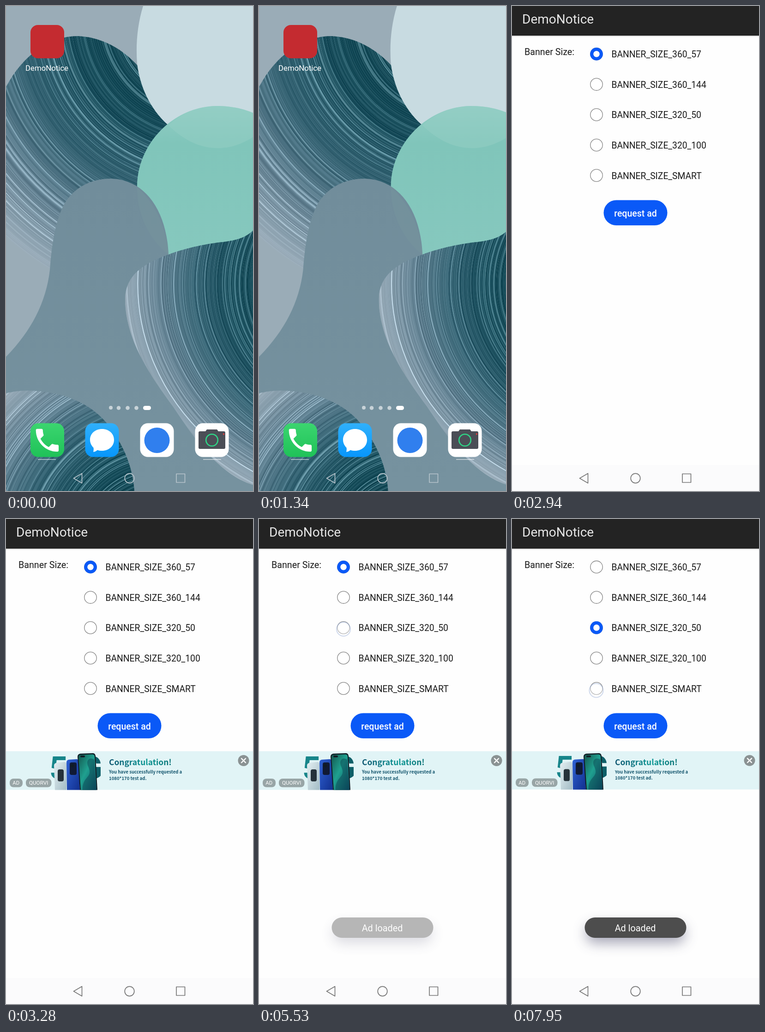
These frames come from a looping animation (535 by 1048 pixels, 8 s). An HTML page:

```html
<!DOCTYPE html>
<html lang="en">
<head>
<meta charset="utf-8">
<title>Banner ad demo</title>
<style>
  html, body { margin: 0; width: 100%; height: 100%; overflow: hidden; background: #fefefe; }
  svg { display: block; width: 535px; height: 1048px; }
  text { font-family: Roboto, Inter, sans-serif; }
  .promo { font-family: "Noto Sans CJK SC", "Noto Sans CJK JP", "Noto Sans", sans-serif; font-weight: 700; }
</style>
</head>
<body>
<svg viewBox="0 0 535 1048" xmlns="http://www.w3.org/2000/svg">
  <defs>
    <clipPath id="c1"><path d="M0 175C38 103 98 65 155 65C212 67 258 98 287 131L360 262L300 420L97 568C60 547 22 518 0 497Z"/></clipPath>
    <clipPath id="c2"><path d="M535 485C518 502 495 507 470 510C440 513 395 521 352 537C300 556 258 580 258 636C260 722 310 795 362 866C405 930 460 1012 535 1035Z"/></clipPath>
    <clipPath id="c3"><path d="M0 837C15 833 32 831 50 831C125 833 183 860 216 899C250 940 274 990 278 1048H0Z"/></clipPath>
    <clipPath id="adClip"><rect y="501.500" width="535" height="84"/></clipPath>
    <linearGradient id="mint" x2="0" y2="1"><stop stop-color="#92cdc4"/><stop offset=".25" stop-color="#80c5ba"/><stop offset="1" stop-color="#86c8be"/></linearGradient>
    <linearGradient id="hill" x2="0" y2="1"><stop stop-color="#718d9b"/><stop offset="1" stop-color="#76929f"/></linearGradient>
    <linearGradient id="green" x2="0" y2="1"><stop stop-color="#3bd56f"/><stop offset="1" stop-color="#1fc258"/></linearGradient>
    <linearGradient id="blue" x2="0" y2="1"><stop stop-color="#30b0fb"/><stop offset="1" stop-color="#0796fb"/></linearGradient>
    <linearGradient id="title" x2="1" y2="0"><stop stop-color="#0d5570"/><stop offset=".6" stop-color="#0f9a96"/><stop offset="1" stop-color="#0c7276"/></linearGradient>
    <linearGradient id="teal" x2="1" y2="1"><stop stop-color="#14584f"/><stop offset=".45" stop-color="#1fa08f"/><stop offset="1" stop-color="#0b4a63"/></linearGradient>
    <linearGradient id="navy" x2="1" y2="1"><stop stop-color="#2f62d4"/><stop offset="1" stop-color="#112f8e"/></linearGradient>
    <linearGradient id="silver" x2="1" y2="1"><stop stop-color="#e4eff2"/><stop offset="1" stop-color="#a3bcc5"/></linearGradient>
    <linearGradient id="drop" x2="0" y2="1"><stop stop-color="#000" stop-opacity=".2"/><stop offset="1" stop-color="#000" stop-opacity="0"/></linearGradient>
    <filter id="blur" x="-30%" y="-100%" width="160%" height="300%"><feGaussianBlur stdDeviation="14"/></filter>
  </defs>

  <g id="home">
    <g id="wall">
      <rect width="535" height="1048" fill="#9aacb7"/>
      <g id="s1" clip-path="url(#c1)"/>
      <path d="M297 0C284 42 281 85 284 125C292 190 325 235 352 258C385 290 420 307 458 307C490 307 515 296 535 283V0Z" fill="#c8dbe1"/>
      <path d="M535 231C510 220 482 216 455 216C360 218 284 300 284 390C284 450 310 505 352 537L470 512C500 507 520 500 535 487Z" fill="url(#mint)"/>
      <path d="M352 258C385 290 420 307 458 307C490 307 515 296 535 283V231C510 220 482 216 455 216C415 217 380 232 352 258Z" fill="#95d0c6" opacity=".5"/>
      <path d="M0 758C55 702 87 640 95 570C100 500 110 460 125 430C145 395 180 373 228 373C300 375 348 440 352 537L535 600V1048H0Z" fill="url(#hill)"/>
      <path d="M284 392C310 415 345 460 352 537C310 505 284 450 284 392Z" fill="#76959e" opacity=".5"/>
      <g id="s2" clip-path="url(#c2)"/>
      <g id="s3" clip-path="url(#c3)"/>
    </g>

    <rect x="53" y="41" width="73" height="72" rx="16" fill="#c42b30"/>
    <g fill="#fff">
      <g opacity=".6"><circle cx="227" cy="868" r="4"/><circle cx="244" cy="868.500" r="4.300"/><circle cx="263.500" cy="868.500" r="4.300"/><circle cx="282.500" cy="868.500" r="4.300"/></g>
      <rect x="297" y="864" width="17" height="9" rx="4.500"/>
      <path d="M69 979h39v1.500h-39zM427 979h39v1.500h-39z" opacity=".65"/>
    </g>
    <rect x="53" y="901.500" width="73" height="73" rx="17" fill="url(#green)"/>
    <path transform="translate(56.500 905.500) scale(2.740)" fill="#fff" d="M6.620 10.790c1.440 2.830 3.760 5.140 6.590 6.590l2.200-2.200c.27-.27.67-.36 1.020-.24 1.120.37 2.330.57 3.570.57.55 0 1 .45 1 1V20c0 .55-.45 1-1 1-9.390 0-17-7.610-17-17 0-.55.45-1 1-1h3.500c.55 0 1 .45 1 1 0 1.250.2 2.450.57 3.570.11.35.03.74-.25 1.020z"/>
    <rect x="171.500" y="901.500" width="73" height="73" rx="17" fill="url(#blue)"/>
    <path fill="#fff" d="M208 914C223 914 234 924 234 937.500S223 961 208 961C204 961 201 960.500 198 959.500C195 962 192 963.500 189 963.500C190 960 190 957 189.500 954.500C185 950 182 944 182 937.500C182 924 193 914 208 914Z"/>
    <rect x="290.500" y="901.500" width="73" height="73" rx="17" fill="#fff"/>
    <circle cx="327" cy="938.500" r="27.500" fill="#307fee"/>
    <rect x="409.500" y="901.500" width="73" height="73" rx="17" fill="#fff"/>
    <path fill="#4b4e56" d="M420 919H432L435 915H457L460 919H472Q475 919 475 922V954Q475 957 472 957H420Q417 957 417 954V922Q417 919 420 919Z"/>
    <circle cx="446" cy="938" r="12.800" fill="#4b4e56" stroke="#2fd486" stroke-width="2.600"/>
    <circle cx="471.500" cy="925" r="1.800" fill="#e23b3b"/>
  </g>

  <g id="app">
    <rect id="back" width="535" height="1048"/>
    <rect y="992" width="535" height="56" fill="#fbfbfc"/>
    <rect y="64" width="535" height="3" fill="url(#drop)"/>
    <rect width="535" height="64" fill="#232323"/>
    <g id="list"/>
    <g id="page">
      <g id="radios"/>
      <rect id="pill" y="419.500" height="54.500" rx="27.250" fill="#0a59f7"/>
      <g id="ad">
        <g clip-path="url(#adClip)">
          <rect y="501.500" width="535" height="84" fill="#e1f4f6"/>
          <g id="big"/>
          <path d="M104 533Q104 528 109 527L126 525Q131 525 131 530V586H106Z" fill="url(#silver)"/>
          <rect x="112" y="541" width="13" height="26" rx="4" fill="#26323a"/>
          <path d="M131 526Q131 521 136 520L153 519Q158 519 158 525L160 586H132Z" fill="url(#navy)"/>
          <rect x="138" y="526" width="15" height="27" rx="4" fill="#101a35"/>
          <path d="M155 514Q155 508 161 507L188 506Q193 506 194 512L198 586H160Z" fill="#101c24"/>
          <path d="M157 514Q157 510 161 509.500L187 508.500Q191.500 508.500 192 513L196 586H162Z" fill="url(#teal)"/>
          <path d="M166 586C164 555 190 560 178 535C172 522 181 513 191 520L195 586Z" fill="#0a3c4c" opacity=".45"/>
          <g fill="#101c24"><circle cx="143.500" cy="533" r="3.500"/><rect x="161" y="511" width="10" height="4" rx="2"/></g>
        </g>
        <rect x="8" y="561" width="28" height="18.500" rx="8" fill="#98a5a6"/>
        <rect x="43" y="561" width="55.500" height="18.500" rx="8" fill="#98a5a6"/>
        <circle cx="514.500" cy="522" r="12" fill="#8a9293"/>
        <path d="M510 517.500l9 9m0-9l-9 9" stroke="#fff" stroke-width="2.400" stroke-linecap="round"/>
      </g>
      <g id="toast">
        <rect x="160" y="876" width="215" height="40" rx="20" fill="#4c4c6c" opacity=".5" filter="url(#blur)"/>
        <rect x="157.500" y="861" width="220" height="44" rx="22" fill="#4d4d4d"/>
      </g>
    </g>
  </g>

  <g id="nav" fill="none" stroke-width="1.700" stroke-linejoin="round">
    <path d="M146.500 1020.500L164.500 1010V1031Z"/><circle cx="267.500" cy="1020.500" r="10.300"/><rect x="369" y="1011" width="18.500" height="18.500"/>
  </g>
  <g id="touch">
    <circle r="14" fill="#fff" opacity=".38"/>
    <circle r="15" fill="none" stroke="#9fb4da" stroke-width="2" opacity=".5"/>
  </g>
</svg>

<script>
const NS = 'http://www.w3.org/2000/svg';
const LOOP = 8000;
const APP = 'DemoNotice';
const $ = id => document.getElementById(id);

function add(parent, tag, attrs) {
  const el = document.createElementNS(NS, tag);
  for (const k in attrs) el.setAttribute(k, attrs[k]);
  return parent.appendChild(el);
}
function label(parent, str, x, y, size, fill, more) {
  const el = add(parent, 'text', { x, y, 'font-size': size, fill, ...more });
  el.textContent = str;
  return el;
}
const mid = { 'text-anchor': 'middle' };

function seeded(n) {
  return () => (n = (n * 16807) % 2147483647) / 2147483647;
}

// Concentric brush strokes, dark at r0 and pale at r1
const tones = [[20, 73, 86], [24, 78, 92], [50, 97, 113], [98, 129, 146], [156, 174, 187]];
function brush(id, cx, cy, ratio, r0, r1, seed) {
  const rnd = seeded(seed), g = $(id);
  for (let r = r0; r < r1 + 40;) {
    const w = 0.6 + rnd() * 1.5;
    const u = Math.min((r - r0) / (r1 - r0), 0.999) * (tones.length - 1);
    const i = Math.floor(u), f = u - i;
    const amp = u > 3.6 ? 12 : 34;
    const shift = (rnd() - 0.5) * amp + (rnd() < 0.15 ? amp * 1.5 : 0);
    const rgb = tones[i].map((c, k) => Math.round(Math.max(8, c + (tones[i + 1][k] - c) * f + shift)));
    add(g, 'ellipse', { cx, cy, rx: r, ry: r * ratio, fill: 'none', stroke: `rgb(${rgb})`, 'stroke-width': w + 0.6 });
    r += w;
  }
}
brush('s1', 430, 20, 1, 150, 645, 71);
brush('s2', 800, 600, 0.92, 230, 548, 913);
brush('s3', 330, 1170, 1, 120, 470, 4407);

label($('home'), APP, 88.5, 140, 16.8, '#fff', mid);
label($('app'), APP, 22, 37.5, 28, '#e6e6e6');

['Native Ad', 'Banner Ad', 'Reward Ad', 'Interstitial Ad'].forEach((name, i) => {
  const y = 78 + i * 101, g = $('list');
  add(g, 'rect', { x: 26.5, y, width: 482, height: 87.5, rx: 16, fill: '#fefefe' });
  label(g, name, 43, y + 52, 22.5, '#1a1a1a');
  label(g, 'next', 426.5, y + 51.5, 20, '#828282');
  add(g, 'path', { d: `M474.500 ${y + 33}L482.500 ${y + 43.5}L474.500 ${y + 54}`, fill: 'none', stroke: '#b0b0b0', 'stroke-width': 4, 'stroke-linecap': 'round' });
});

label($('radios'), 'Banner Size:', 27, 106, 19.7, '#1a1a1a');
const radios = ['360_57', '360_144', '320_50', '320_100', 'SMART'].map((name, i) => {
  const cy = 103.7 + i * 65.6, g = $('radios');
  add(g, 'circle', { cx: 183, cy, r: 13.2, fill: '#fff', stroke: '#858585', 'stroke-width': 1.3 });
  label(g, 'BANNER_SIZE_' + name, 215.5, cy + 7.4, 19.3, '#1a1a1a');
  const on = add(g, 'g', {});
  add(on, 'circle', { cx: 183, cy, r: 13.8, fill: '#0a59f7' });
  add(on, 'circle', { cx: 183, cy, r: 6.8, fill: '#fff' });
  return on;
});

const caption = label($('page'), '', 267.5, 454.5, 19.5, '#fff', { ...mid, 'font-weight': 500 });
label($('big'), '5', 94, 562, 69, '#17858a', { 'font-weight': 700 });
label($('big'), 'G', 163, 561, 67, '#0d5f68', { 'font-weight': 700 });
const promo = { class: 'promo' };
label($('ad'), 'Congratulation!', 223, 532, 17.4, 'url(#title)', promo);
label($('ad'), 'You have successfully requested a', 223, 550.3, 9.57, '#14566e', promo);
label($('ad'), '1080*170 test ad.', 223, 564, 9.57, '#14566e', promo);
label($('ad'), 'AD', 21.8, 574.3, 11.4, '#fff', mid);
label($('ad'), 'QUORVI', 70.7, 574.3, 11.7, '#fff', mid);
label($('toast'), 'Ad loaded', 267, 890.5, 19.8, '#fff', mid);

const ramp = (t, a, b) => Math.min(1, Math.max(0, (t - a) / (b - a)));
const show = (el, on) => el.setAttribute('visibility', on ? 'inherit' : 'hidden');
const within = (t, a, b) => t >= a && t < b;

// start, end, x, y
const taps = [[5470, 5670, 183, 238], [6410, 6640, 262, 458.5], [7945, 8000, 182.5, 370.5]];

function draw(t) {
  const home = t < 1670, list = !home && t < 2930;
  show($('home'), home);
  show($('app'), !home);
  show($('list'), list);
  show($('page'), !home && !list);
  $('back').setAttribute('fill', list ? '#eff1f3' : '#fefefe');
  $('nav').setAttribute('stroke', home ? '#b6c3cb' : '#777');
  $('wall').setAttribute('transform', `scale(${1 + 0.006 * ramp(t, 70, 480)} 1)`);

  const pick = ramp(t, 5600, 5750);
  radios.forEach((el, i) => el.setAttribute('opacity', i === 0 ? 1 - pick : i === 2 ? pick : 0));

  const loading = within(t, 6480, 6815);
  caption.textContent = loading ? 'loading...' : 'request ad';
  const w = loading ? 123 : 138;
  $('pill').setAttribute('x', 267.5 - w / 2);
  $('pill').setAttribute('width', w);

  $('ad').setAttribute('opacity', ramp(t, 3130, 3200));
  $('ad').setAttribute('transform', t < 6480 ? '' : 'translate(0 5.015) scale(1 .99)');
  $('toast').setAttribute('opacity', t < 6000
    ? ramp(t, 3300, 3420) * (1 - ramp(t, 5400, 5620))
    : ramp(t, 6815, 7000));

  const tap = taps.find(([a, b]) => within(t, a, b));
  show($('touch'), !!tap);
  if (tap) $('touch').setAttribute('transform', `translate(${tap[2]} ${tap[3]})`);
}

const start = performance.now();
function tick() {
  draw((performance.now() - start) % LOOP);
  requestAnimationFrame(tick);
}
tick();
</script>
</body>
</html>
```
